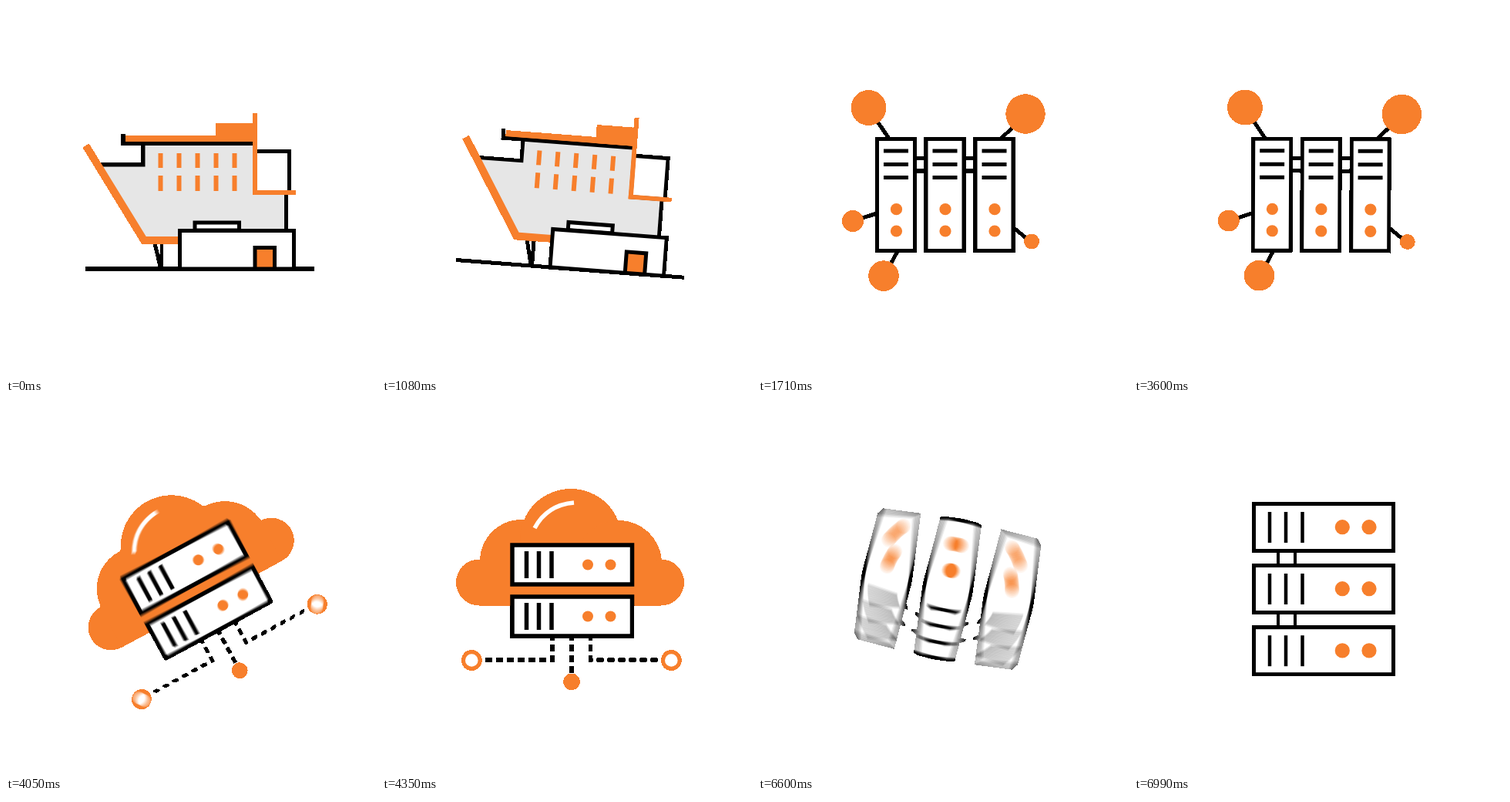
Animation of 480x480 px, one loop 8000 ms. Source, as an HTML page with a canvas:

```html
<!DOCTYPE html>
<html lang="en">
<head>
<meta charset="utf-8">
<title>Spinning server icons</title>
<style>
  html, body { margin: 0; width: 100%; height: 100%; overflow: hidden; background: #fff; }
  canvas { display: block; width: 100vw; height: 100vh; }
</style>
</head>
<body>
<canvas id="stage" width="480" height="480"></canvas>
<script>
const SIZE = 480;
const LOOP = 8000, STEP = 30;
const SPINS = [807, 3447, 6087], SPIN_MS = 1000;
const SMEAR = 29, MAX_SMEAR = 16, MAX_SAMPLES = 16;
const ORANGE = '#f77f2c', GREY = '#e6e6e6', BLACK = '#000', WHITE = '#fff';

const view = document.getElementById('stage').getContext('2d');
const buffer = document.createElement('canvas');
buffer.width = buffer.height = SIZE;
const g = buffer.getContext('2d', { willReadFrequently: true });
const sum = new Float32Array(SIZE * SIZE * 4);
const output = view.createImageData(SIZE, SIZE);

// Drawing helpers
function line(pts, width = 5, color = BLACK) {
  g.beginPath();
  for (let i = 0; i < pts.length; i += 2) g.lineTo(pts[i], pts[i + 1]);
  g.lineWidth = width;
  g.strokeStyle = color;
  g.stroke();
}
function area(pts, color) {
  g.beginPath();
  for (let i = 0; i < pts.length; i += 2) g.lineTo(pts[i], pts[i + 1]);
  g.fillStyle = color;
  g.fill();
}
function block(x1, y1, x2, y2, color = ORANGE) {
  g.fillStyle = color;
  g.fillRect(x1, y1, x2 - x1, y2 - y1);
}
function frame(x1, y1, x2, y2, fill = WHITE, width = 5) {
  block(x1, y1, x2, y2, fill);
  g.lineWidth = width;
  g.strokeStyle = BLACK;
  g.strokeRect(x1, y1, x2 - x1, y2 - y1);
}
function dot(x, y, r, color = ORANGE) {
  g.beginPath();
  g.arc(x, y, r, 0, 2 * Math.PI);
  g.fillStyle = color;
  g.fill();
}

function building() {
  area([122, 206, 178, 206, 178, 178, 322, 178, 322, 242, 363, 242,
        363, 291, 225, 291, 225, 303, 179, 303], GREY);
  line([193, 308, 200.5, 340]);
  line([202, 308, 202, 340]);
  line([103, 341, 400, 341]);
  line([122, 206, 178, 206, 178, 178]);
  line([152, 166, 152, 178.5, 321, 178.5]);
  line([363.5, 243, 363.5, 291]);
  frame(323, 188.5, 367.5, 242);
  block(155, 168, 322, 176);
  block(272, 152, 322, 176);
  block(320, 139, 326, 245);
  block(320, 239, 376, 245);
  line([103.5, 181, 179, 304, 224, 304], 10, ORANGE);
  for (let i = 0; i < 5; i++) {
    const x = 197.5 + 24 * i;
    block(x, 191, x + 6, 210);
    block(x, 220, x + 6, 240);
  }
  frame(245, 281, 302.5, 291);
  frame(225.5, 291.5, 373.5, 341);
  frame(323, 313.5, 348.5, 341, ORANGE);
}

function network() {
  line([155, 150, 170, 172]);
  line([331, 157, 314, 173]);
  line([134, 275.5, 154, 269]);
  line([172, 335, 181, 318]);
  line([332, 288, 349, 302]);
  dot(143.5, 132, 23);
  dot(347, 140, 25.7);
  dot(123, 279, 14);
  dot(163, 350, 19.8);
  dot(355, 305.5, 10);
  for (const y of [197.5, 214]) line([204, y, 282, y]);
  for (const x of [154.5, 218, 282]) {
    frame(x, 172.5, x + 49, 317.5);
    for (const y of [188, 205.5, 222.5]) line([x + 8.5, y, x + 40.5, y]);
    dot(x + 25, 263.7, 7.6);
    dot(x + 25, 292, 7.6);
  }
}

function cloud() {
  dot(126, 231.5, 30);
  dot(181, 204, 54);
  dot(245, 176, 66);
  dot(307, 207, 56);
  dot(362, 231.5, 30);
  block(126, 203, 362, 261.5);
  g.beginPath();
  g.moveTo(198, 161);
  g.quadraticCurveTo(214, 131, 249, 128);
  g.lineWidth = 5.5;
  g.strokeStyle = WHITE;
  g.stroke();

  g.setLineDash([9, 5]);
  g.lineDashOffset = 4;
  line([221, 302, 221, 332, 128, 332], 5.5);
  line([270.5, 302, 270.5, 332, 363, 332], 5.5);
  line([246, 302, 246, 351], 6);
  g.setLineDash([]);
  for (const x of [116.3, 375.3]) {
    dot(x, 332.5, 13.4);
    dot(x, 332.5, 8.3, WHITE);
  }
  dot(246, 360.3, 10.8);

  for (const y of [183, 250]) {
    frame(169, y, 324.5, y + 51, WHITE, 5.5);
    for (const x of [187.5, 203.5, 220]) line([x, y + 8, x, y + 43], 5.5);
    dot(267, y + 25.5, 7);
    dot(296.5, y + 25.5, 7);
  }
}

function rack() {
  for (const x of [187, 208.7]) line([x, 190, x, 290], 4.3);
  for (const y of [129.5, 209.5, 289.7]) {
    frame(155.5, y, 336.5, y + 61);
    for (const x of [176, 197, 218.5]) line([x, y + 10.5, x, y + 50.5], 4.5);
    dot(270.3, y + 30.2, 9.6);
    dot(305, y + 30.2, 9.6);
  }
}

// Each scene turns about its own centre
const SCENES = [
  { draw: building, x: 249.5, y: 241.5 },
  { draw: network, x: 240.3, y: 240 },
  { draw: cloud, x: 246, y: 240 },
  { draw: rack, x: 246, y: 240 }
];

function easeQuint(p) {
  p = Math.min(1, Math.max(0, p));
  return p < 0.5 ? 16 * p ** 5 : 1 - 16 * (1 - p) ** 5;
}
// Total turn in degrees since the start of the loop
function turn(t) {
  return SPINS.reduce((a, start) => a + 180 * easeQuint((t - start) / SPIN_MS), 0);
}

// Averages rotated copies into a spin blur, then keeps only well covered pixels
function render(t) {
  const index = SPINS.filter(start => t >= start + SPIN_MS / 2).length;
  const scene = SCENES[index];
  let base = turn(t) - 180 * index;
  if (Math.abs(base) < 0.09) base = 0;
  const speed = (turn(t + 5) - turn(t - 5)) / 10;
  const smear = Math.min(MAX_SMEAR, SMEAR * speed ** 2);
  const count = smear < 0.3 ? 1 : Math.min(MAX_SAMPLES, 4 + Math.ceil(smear * 2));

  sum.fill(0);
  for (let k = 0; k < count; k++) {
    const angle = base + smear * ((k + 0.5) / count - 0.5);
    g.setTransform(1, 0, 0, 1, 0, 0);
    g.clearRect(0, 0, SIZE, SIZE);
    g.translate(scene.x, scene.y);
    g.rotate(angle * Math.PI / 180);
    g.translate(-scene.x, -scene.y);
    scene.draw();
    const px = g.getImageData(0, 0, SIZE, SIZE).data;
    for (let i = 0; i < px.length; i += 4) {
      const a = px[i + 3];
      if (!a) continue;
      sum[i] += px[i] * a;
      sum[i + 1] += px[i + 1] * a;
      sum[i + 2] += px[i + 2] * a;
      sum[i + 3] += a;
    }
  }

  const out = output.data;
  const least = (0.5 + 0.015 * smear) * 255 * count;
  out.fill(255);
  for (let i = 0; i < out.length; i += 4) {
    const a = sum[i + 3];
    if (a < least) continue;
    for (let c = 0; c < 3; c++) out[i + c] = sum[i + c] / a;
  }
  view.putImageData(output, 0, 0);
}

const begin = performance.now();
let shown = -1;
function tick() {
  const t = Math.floor((performance.now() - begin) % LOOP / STEP) * STEP;
  if (t !== shown) {
    const still = shown >= 0 && t > shown && turn(t + STEP) - turn(shown - STEP) < 1e-6;
    if (!still) render(t);
    shown = t;
  }
  requestAnimationFrame(tick);
}
tick();
</script>
</body>
</html>
```
